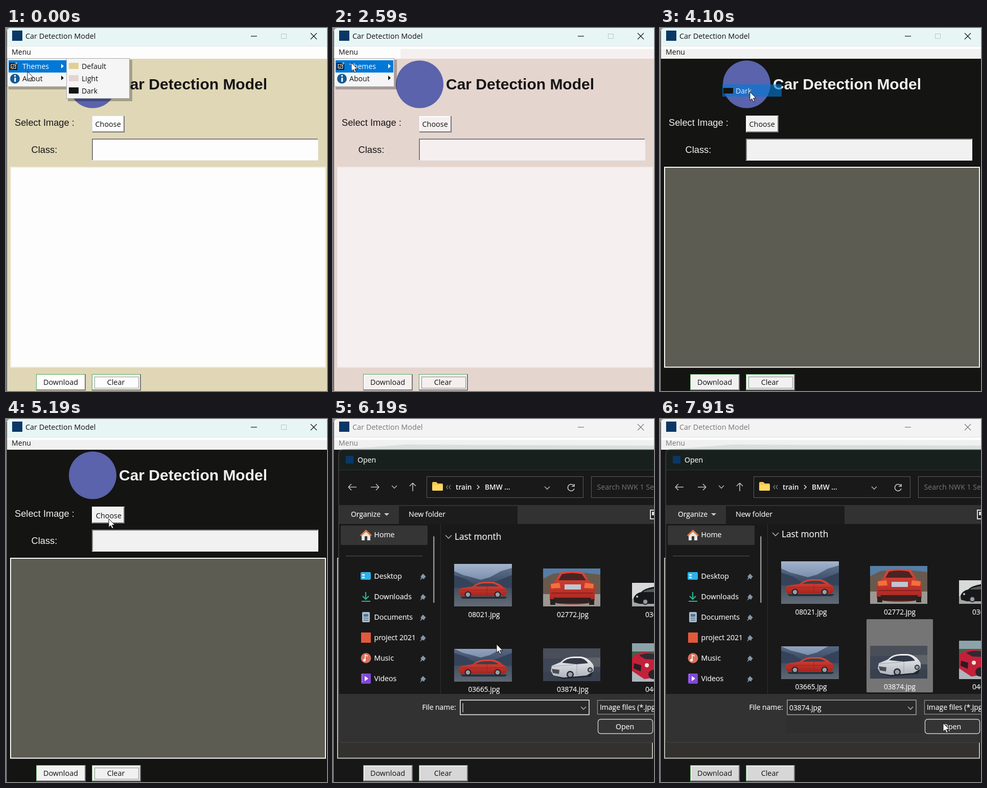
An HTML page that plays this animation: 628 px wide and 709 px high, repeating every 8000 ms.

```html
<!DOCTYPE html>
<html lang="en">
<head>
<meta charset="utf-8">
<title>Car Detection Model</title>
<style>
html, body { margin: 0; width: 100%; height: 100%; overflow: hidden; background: #333; }
svg { display: block; }
text { font-family: "Open Sans", "Noto Sans", sans-serif; font-size: 14.1px; white-space: pre; }
.arial { font-family: "Liberation Sans", Arial, sans-serif; font-size: 18.3px; fill: var(--fg); }
.head { font-size: 30px; font-weight: bold; }
.mid { text-anchor: middle; }
.line { fill: none; stroke-width: 1.6; }
#dialog text { fill: #f4f4f4; stroke: #f4f4f4; stroke-width: .2px; }
#dialog .dim { fill: #777; stroke: none; }
#dialog .file { font-size: 13.7px; text-anchor: middle; }
#dialog .crumb { font-size: 13.7px; font-weight: 600; stroke: none; }
</style>
</head>
<body>
<svg id="stage" width="628" height="709" viewBox="0 0 628 709"></svg>
<script>
const LOOP = 8000;
const stage = document.getElementById('stage');

const rect = (x, y, w, h, fill, more = '') =>
  `<rect x="${x}" y="${y}" width="${w}" height="${h}" fill="${fill}" ${more}/>`;
const path = (d, fill, more = '') => `<path d="${d}" fill="${fill}" ${more}/>`;
const line = (d, stroke, more = '') => `<path class="line" d="${d}" stroke="${stroke}" ${more}/>`;
const circle = (x, y, r, fill) => `<circle cx="${x}" cy="${y}" r="${r}" fill="${fill}"/>`;
const text = (x, y, s, more = '') => `<text x="${x}" y="${y}" ${more}>${s}</text>`;
const group = (id, body, more = '') => `<g id="${id}" ${more}>${body}</g>`;
const fade = (id, top, bottom) => `<linearGradient id="${id}" x2="0" y2="1"><stop stop-color="${top}"/>` +
  `<stop offset="1" stop-color="${bottom}"/></linearGradient>`;

const gradients = fade('sky', '#a3b4cb', '#6f84a4') + fade('hills', '#5d6f8c', '#2f3c52') +
  fade('road', '#44505f', '#6a727c') + fade('redPaint', '#dc4638', '#a52420') + fade('whitePaint', '#f0f1f3', '#aeb4bd');

// Window colours for each theme
const themes = {
  default: { title: '#e7f6f5', ink: '#111', bar: '#fdfdfd', bg: '#e0d7b7', fg: '#151515', field: '#fdfdfd', bevel: '#fff', canvas: '#fdfdfd', edge: '#f1ecdd' },
  light: { title: '#e7f6f5', ink: '#111', bar: '#f5f0ef', bg: '#e5d5cf', fg: '#151515', field: '#f5f0ef', bevel: '#fff', canvas: '#f5f0ef', edge: '#f1e8e5' },
  dark: { title: '#e7f6f5', ink: '#111', bar: '#f1f1f1', bg: '#141413', fg: '#f1f1f1', field: '#f1f1f1', bevel: '#fff', canvas: '#5d5c52', edge: '#fafafa' },
  inactive: { title: '#f3f3f3', ink: '#777', bar: '#f0f0f0', bg: '#171717', fg: '#f1f1f1', field: '#d7d7d7', bevel: '#ebebeb', canvas: '#32312d', edge: '#bdbdba' }
};

function button(x, y, w, h, rim) {
  return rect(x, y, w, h, rim) + rect(x + 1, y + 1, w - 1, h - 1, '#777') +
    rect(x + 1, y + 1, w - 3, h - 3, 'var(--bevel)') + rect(x + 3, y + 3, w - 5, h - 5, 'var(--field)');
}

function mainWindow() {
  return rect(0, 0, 628, 709, '#9a9a9a') + rect(1, 6, 1, 703, '#333') +
    path('M2 36V8Q2 0 9 0H628V36Z', 'var(--title)') +
    rect(12, 5, 20, 20, '#0b3766') +
    text(38, 21, 'Car Detection Model', 'fill="var(--ink)" style="font-size:14.4px"') +
    line('M479 16H491', 'var(--ink)', 'style="stroke-width:1.2"') +
    group('maxBox', line('M538.500 11.500h10v9h-10Z', '#b9c5c4', 'style="stroke-width:1"')) +
    line('M596 10L608 22M608 10L596 22', 'var(--ink)', 'style="stroke-width:1.2"') +
    rect(2, 35, 626, 25, 'var(--bar)') + rect(2, 36, 626, 5, '#fdfdfd') + rect(2, 35, 626, 1, '#dfe6e5') +
    path('M10 60L140 50L628 52V60Z', '#d9dfdc', 'id="barShade"') +
    rect(2, 41, 54, 19, '#fdfdfd', 'id="menuHover"') + rect(2, 36, 130, 24, '#fdfdfd', 'id="menuStrip"') +
    text(11, 52, 'Menu', 'fill="var(--ink)"') +
    rect(2, 60, 626, 649, 'var(--bg)') +
    circle(169.5, 110, 46.5, '#5a63ab') +
    text(221, 120, 'Car Detection Model', 'class="arial head"') +
    text(17, 191, 'Select Image :', 'class="arial"') +
    text(49.5, 244, 'Class:', 'class="arial"') +
    button(168, 171, 64, 33, '#d9d9d9') +
    text(174.5, 192.5, 'Choose', 'id="choose" fill="#111" style="font-size:14.4px"') +
    rect(168, 216, 443, 43, '#ececec') + rect(168, 216, 442, 42, '#808080') + rect(170, 218, 440, 40, 'var(--field)') +
    rect(9, 272, 616, 390.5, 'var(--canvas)', 'stroke="var(--edge)" stroke-width="2"') +
    button(59, 676, 97, 32, '#52a852') + button(168, 676, 96, 32, '#52a852') +
    text(107, 697, 'Download', 'class="mid" fill="#111" style="font-size:14.4px"') +
    text(215, 697, 'Clear', 'class="mid" fill="#111" style="font-size:14.4px"') +
    group('focus', rect(173.5, 681.5, 86, 22, 'none', 'stroke="#222" stroke-dasharray="1 1"'));
}

const panel = (x, y, w, h) => rect(x + 3, y + 3, w + 2, h + 2, '#0004') +
  rect(x + .5, y + .5, w - 1, h - 1, '#f5f5f5', 'stroke="#aaa"');
const BLUE = '#0078d7';
const subItems = [['Default', '#e2cf94'], ['Light', '#e6d4d2'], ['Dark', '#131313']];

function menus() {
  const main = panel(2, 59, 118, 56) + rect(5, 63, 113, 24, BLUE, 'id="themesHot"') +
    rect(7, 68, 15, 14, '#111') + line('M10 71h9v8h-9Z', '#fff', 'style="stroke-width:1.2"') +
    line('M10 80L21 68', '#fff', 'style="stroke-width:3"') + line('M9 81L20 69', '#111') +
    text(32, 80, 'Themes', 'id="themesText"') + path('M108 70v9l5 -4.5Z', '#111', 'id="themesArrow"') +
    circle(17.5, 99, 9.5, '#15598f') + rect(16.3, 97, 3, 8, '#fff') + circle(17.6, 93.5, 1.8, '#fff') +
    text(32, 104, 'About', 'fill="#111"') + path('M108 93v9l5 -4.5Z', '#111');
  const sub = panel(118, 59, 124, 79) + rect(121, 62, 117, 24, BLUE, 'id="subHot"') +
    subItems.map(([name, color], i) => rect(123, 68 + 24 * i, 19, 12, color) +
      text(148, 80 + 24 * i, name, `id="sub${i}"`)).join('');
  const ghost = rect(122, 86, 116, 24, BLUE, 'opacity=".62"') +
    rect(124, 93, 19, 11, '#f3e4e2', 'id="ghostSwatch"') + text(148, 104, 'Light', 'id="ghostText" fill="#dceaf5"');
  return group('mainMenu', main) + group('subMenu', sub) + group('ghost', ghost);
}

// Simplified photo tiles
const photo = (x, y, w, h, body) => `<svg x="${x}" y="${y}" width="${w}" height="${h}">${body}</svg>`;
const wheel = (x, y, r) => circle(x, y, r, '#23252a') + circle(x, y, r * .65, '#9a9ea6');

const coupe = path('M12 64H104L100 68H16Z', '#2b3038') +
  path('M9 54Q9 47 22 46L36 44Q46 35 60 35H74Q86 36 96 45Q103 47 103 57L98 63H15Q9 62 9 54Z', 'url(#redPaint)') +
  path('M41 44Q49 38 60 38H73Q81 39 87 44Z', '#39424f') + line('M64 38V60M13 51H100', '#8f211e', 'style="stroke-width:.8"') +
  wheel(27, 60, 6.5) + wheel(85, 60, 6.5);

const lake = dy => `<g transform="translate(0 ${dy})">` + rect(0, 0, 113, 40, 'url(#sky)') +
  path('M0 14L18 22L34 26L52 31L70 26L92 14L113 8V54H0Z', 'url(#hills)') +
  path('M0 22L24 30L48 46H0ZM113 22L82 34L64 46H113Z', '#35435a') +
  rect(0, 47, 113, 45, 'url(#road)') + coupe + '</g>';

const rearView = rect(0, 0, 113, 74, '#9b9893') + path('M0 0H113V20L86 30H0Z', '#577da5') +
  path('M0 20L20 10L60 6L113 12V50H0Z', '#68594d') +
  path('M13 34L24 25L33 8Q56 3 80 8L90 25L101 34V62Q94 70 57 70Q20 70 13 62Z', 'url(#redPaint)') +
  path('M30 23L37 11Q57 7 76 11L84 23Z', '#4a2423') +
  path('M15 30L32 28L34 38L16 39ZM99 30L82 28L80 38L98 39Z', '#f2703a') +
  rect(42, 31, 32, 10, '#bfc6d2') + line('M16 48H98', '#7c1d1a') + path('M20 57H94L88 68H26Z', '#34201f') +
  rect(14, 60, 10, 11, '#222') + rect(90, 60, 10, 11, '#222');

const whiteCar = rect(0, 0, 113, 64, '#3f4655') + rect(0, 0, 113, 20, '#4a4e58') +
  rect(64, 18, 49, 18, '#5f636a') + rect(0, 46, 113, 18, '#39414f') + path('M16 52L97 47L94 55L40 60Z', '#22262e') +
  path('M15 44L17 34L34 27Q44 16 61 16H74Q88 18 96 29Q101 34 98 45L85 53L40 57L20 53Z', 'url(#whitePaint)') +
  path('M37 28Q46 19 60 19H73Q82 20 88 29L65 31Z', '#343a47') + line('M18 35L60 32M66 31V52', '#9499a3', 'style="stroke-width:.8"') +
  wheel(53, 51, 7) + wheel(92, 42, 5) + path('M17 40L32 42L31 50L19 48Z', '#4a4d53');

const blackCar = rect(0, 0, 60, 46, '#d8d9d9') + rect(0, 31, 60, 15, '#a5a6a6') +
  path('M3 30Q7 20 18 18Q27 8 60 6V41H15L4 38Z', '#17181a') + path('M21 18Q29 11 60 10V18Z', '#55585c') +
  wheel(26, 37, 6) + circle(10, 27, 2, '#c7c9cb');

const frontCar = rect(0, 0, 60, 75, '#466048') + rect(0, 0, 60, 16, '#8ca4a9') + rect(0, 51, 60, 24, '#aeb5bd') +
  path('M0 28Q10 18 23 17L60 22V65L24 70L0 54Z', '#c3213a') + path('M14 24Q26 16 60 24V32L26 31Z', '#322934') +
  path('M4 39L18 43L17 55L3 49Z', '#2a1c22') + circle(29, 43, 4, '#efe7dd') + circle(41, 61, 9, '#27252a');

function sidebar() {
  const pin = y => path(`M171 ${y + 1}l5 -6l6 6l-2 1l-2 4l-3 -2l-5 4l3 -6Z`, '#8596a4');
  const names = ['Desktop', 'Downloads', 'Documents', 'project 2021', 'Music', 'Videos'];
  const icons = [
    rect(54, 299, 20, 15, '#2eb0e8', 'rx="2"') + rect(57, 303, 5, 3, '#d9f3ff') + rect(57, 308, 5, 3, '#d9f3ff'),
    line('M64 338V351M58 346L64 352L70 346M56 356H73', '#2fb191', 'style="stroke-width:2.2"'),
    rect(57, 377, 15, 20, '#a8bccd', 'rx="2"') + rect(60, 381, 9, 5, '#55748e') + line('M60 389H69M60 393H69', '#55748e'),
    rect(55, 417, 19, 20, '#e2593b'),
    circle(64.5, 467, 10, '#d9725f') + line('M63 471V461L68 463', '#fff') + circle(61.5, 471, 2.5, '#fff'),
    rect(55, 497, 19, 20, '#8247d6', 'rx="2"') + path('M62 502v10l7 -5Z', '#fff') + line('M57.5 499V515', '#c8a9f3', 'stroke-dasharray="2 2"')
  ];
  return rect(15, 208, 170, 38, '#353535', 'rx="2"') +
    path('M56 228V237H62V229H67V237H73V228L64.5 220Z', '#e8e5e1') + line('M54 228L64.5 218L75 228', '#e27b42', 'style="stroke-width:3"') +
    text(80.5, 231.3, 'Home') + rect(25, 267, 150, 1, '#555') +
    names.map((name, i) => icons[i] + text(80.5, 311.7 + 40 * i, name) + pin(307 + 40 * i)).join('') +
    rect(196, 229, 2.5, 130, '#929292', 'rx="1"') + rect(210, 205, 1, 332, '#303030');
}

function files() {
  const tile = (id, x) => rect(x, 396, 130, 143, '#393939', `id="${id}" rx="2"`);
  return tile('hotLeft', 229) + tile('hotRight', 404) +
    line('M220 227L226 233L232 227', '#aaa') + text(238, 236, 'Last month', 'style="font-size:17.3px"') +
    photo(237, 283, 113, 83, lake(0)) + photo(411, 292, 112, 74, rearView) + photo(585, 320, 43, 46, blackCar) +
    photo(237, 449, 113, 64, lake(-14)) + photo(411, 448, 112, 65, whiteCar) + photo(585, 438, 43, 75, frontCar) +
    text(295.5, 387, '08021.jpg', 'class="file"') + text(469, 387, '02772.jpg', 'class="file"') + text(611, 387, '03614.jpg', 'style="font-size:13.7px"') +
    text(295.5, 533, '03665.jpg', 'class="file"') + text(469, 533, '03874.jpg', 'class="file"') + text(611, 533, '04052.jpg', 'style="font-size:13.7px"');
}

function dialog() {
  const chevron = (x, y) => line(`M${x - 5} ${y - 2}l5 5l5 -5`, '#aaa');
  const field = (x, y, w, h, stroke) => rect(x + .5, y + .5, w, h, '#191919', `stroke="${stroke}"`);
  const arrow = (x, turn) => line('M-8 0H8M-8 0L-2 -6M-8 0L-2 6', '#bbb', `transform="translate(${x} 133) rotate(${turn})"`);
  return path('M11 68Q11 60 19 60H640V632H19Q11 632 11 624Z', '#323232', 'stroke="#484848"') +
    path('M12 100V68Q12 61 19 61H640V100Z', '#18201d') + rect(12, 99, 628, 1, '#303735') +
    rect(25, 72, 15, 15, '#0b3766') + text(48, 85, 'Open') +
    rect(12, 100, 628, 68, '#191919') +
    arrow(38, 0) + arrow(82, 180) + chevron(120, 132) + arrow(156, 90) +
    field(183, 112, 306, 41, '#5c5c5c') +
    path('M194 125q0 -2 2 -2h6l3 3h8q2 0 2 2v10q0 2 -2 2h-17q-2 0 -2 -2Z', '#f6c84c') + rect(194, 129, 21, 11, '#ffd965', 'rx="2"') +
    line('M225 129l-3 4l3 4M230 129l-3 4l3 4', '#999', 'style="stroke-width:1.2"') +
    text(240, 138, 'train', 'class="crumb"') + line('M282 129l4 4l-4 4', '#ddd') + text(297, 138, 'BMW ...', 'class="crumb"') +
    chevron(419, 134) + line('M471 130A6.5 6.5 0 1 0 472 136M472 127V131.5H467', '#ccc') +
    field(505, 112, 140, 41, '#5c5c5c') + text(516.5, 138, 'Search NWK 1 Series', 'class="dim"') +
    rect(129, 170, 232, 35, '#1c1c1c', 'id="toolPatch"') + rect(129, 170, 109, 33, '#40424a', 'id="folderHot"') +
    text(35, 191, 'Organize', 'style="font-size:13.9px"') + path('M100 184h10l-5 5Z', '#ccc') + text(148, 191, 'New folder') +
    rect(621, 178, 20, 17, '#222', 'stroke="#ddd" stroke-width="2"') + rect(624, 181, 14, 7, '#ddd') +
    rect(12, 205, 628, 332, '#191919') +
    '<clipPath id="body"><rect x="12" y="205" width="630" height="332"/></clipPath>' +
    `<g clip-path="url(#body)">${group('files', files())}</g>` + sidebar() +
    rect(248, 579, 267, 34, '#2f2f2f', 'id="formPatch"') +
    text(174.5, 568, 'File name:', 'style="font-size:13.9px"') +
    rect(249, 549, 252, 28.5, '#292929', 'id="nameBox" stroke-width="1.6"') + chevron(490, 564) +
    rect(253.5, 555, 1.2, 18, '#ddd', 'id="caret"') + text(253, 569, '03874.jpg', 'id="fileName" style="font-size:13.8px"') +
    rect(517.5, 549.5, 130, 27, '#2b2b2b', 'stroke="#8d8d8d" stroke-width="1.3"') + text(522, 568, 'Image files (*.jpg', 'style="font-size:13.9px"') +
    rect(518.5, 586.5, 107, 28, '#343434', 'rx="5" stroke="#cfcfcf" stroke-width="1.4"') + text(571, 606, 'Open', 'class="mid"');
}

stage.innerHTML = `<defs>${gradients}</defs>` + mainWindow() + menus() + group('dialog', dialog()) +
  group('cursor', path('M0 0V16.5L3.8 13L6.5 19L9.2 17.8L6.6 12H12Z', '#fff', 'stroke="#111" stroke-width="1"'));

const el = {};
stage.querySelectorAll('[id]').forEach(node => el[node.id] = node);

// Pointer stops: time, x, y
const stops = [
  [0, 42, 85], [280, 62, 80], [406, 90, 75], [532, 118, 71], [658, 150, 73], [784, 168, 84], [910, 174, 96],
  [1460, 130, 84], [1610, 69, 65], [1890, 25, 48], [2320, 28, 52], [2460, 36, 68], [2600, 46, 74], [2740, 51, 76],
  [3140, 80, 77], [3280, 112, 78], [3420, 140, 84], [3560, 165, 106], [3700, 176, 125],
  [4240, 184, 145], [4380, 192, 168], [4515, 198, 186], [4650, 201, 195],
  [5800, 225, 260], [5970, 275, 360], [6150, 320, 440], [6330, 345, 480], [6960, 422, 492],
  [7390, 440, 504], [7563, 490, 550], [7737, 535, 583], [7910, 554, 594]
];

const show = (node, on) => node.setAttribute('display', on ? 'inline' : 'none');

function render(t) {
  const within = (a, b) => t >= a && t < b;
  const [, x, y] = stops.findLast(stop => stop[0] <= t);
  el.cursor.setAttribute('transform', `translate(${x} ${y})`);

  const open = t >= 5500;
  const theme = open ? 'inactive' : t < 1340 ? 'default' : t < 4100 ? 'light' : 'dark';
  for (const [key, color] of Object.entries(themes[theme])) stage.style.setProperty('--' + key, color);
  show(el.maxBox, !open);
  show(el.focus, !open);
  show(el.barShade, open);
  show(el.menuHover, within(1890, 2320));
  show(el.menuStrip, within(2320, 4100));
  el.choose.setAttribute('transform', t >= 5190 ? 'translate(1.3 1)' : '');

  const subOpen = t < 1340 || within(3140, 4100);
  const themesHot = subOpen || t >= 2460;
  show(el.mainMenu, t < 1340 || within(2320, 4100));
  show(el.subMenu, subOpen);
  show(el.themesHot, themesHot);
  el.themesText.setAttribute('fill', themesHot ? '#fff' : '#111');
  el.themesArrow.setAttribute('fill', themesHot ? '#fff' : '#111');
  const hot = x > 121 && x < 238 ? Math.floor((y - 62) / 24) : -1;
  show(el.subHot, hot >= 0);
  el.subHot.setAttribute('y', 62 + 24 * hot);
  subItems.forEach((item, i) => el['sub' + i].setAttribute('fill', i === hot ? '#fff' : '#111'));

  const darkGhost = t >= 4100;
  show(el.ghost, within(1340, 1460) || within(4100, 4240));
  el.ghost.setAttribute('transform', darkGhost ? 'translate(0 24)' : '');
  el.ghostSwatch.setAttribute('fill', darkGhost ? '#131313' : '#f3e4e2');
  el.ghostText.textContent = darkGhost ? 'Dark' : 'Light';

  const scale = t < 5650 ? .965 : t < 5800 ? .995 : 1;
  show(el.dialog, open);
  el.dialog.setAttribute('opacity', t < 5650 ? .6 : 1);
  el.dialog.setAttribute('transform', `translate(190 200) scale(${scale}) translate(-190 -200)`);
  show(el.folderHot, t < 5800);
  show(el.toolPatch, t >= 5800);
  const picked = t >= 7390;
  el.files.setAttribute('transform', picked ? 'translate(0 -5)' : '');
  show(el.hotLeft, within(6330, 6960));
  show(el.hotRight, t >= 7080);
  el.hotRight.setAttribute('fill', picked ? '#757575' : '#393939');
  el.nameBox.setAttribute('stroke', picked ? '#9a9a9a' : '#e8e8e8');
  show(el.caret, !picked && !within(6580, 6960));
  show(el.fileName, picked);
  show(el.formPatch, picked);
}

const start = performance.now();
function tick() {
  render((performance.now() - start) % LOOP);
  requestAnimationFrame(tick);
}
tick();
</script>
</body>
</html>
```
